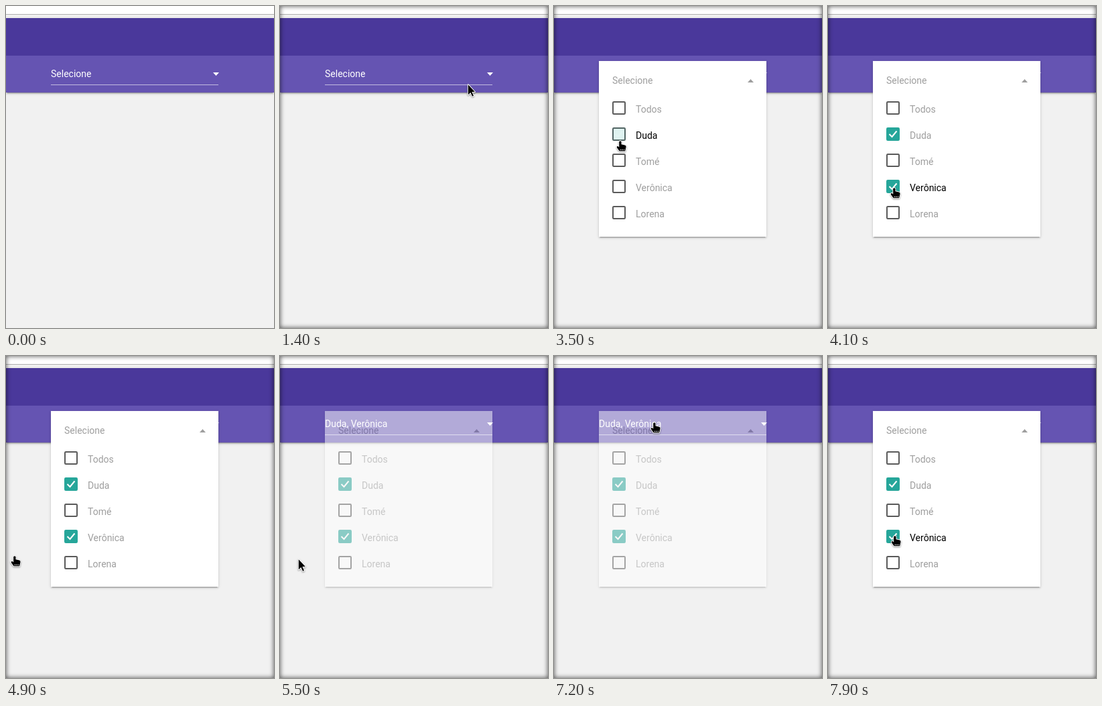
An HTML page that plays this animation: 400x480 px, repeating every 8000 ms.

```html
<!DOCTYPE html>
<html lang="pt-BR">
<head>
<meta charset="utf-8">
<title>Multi-select</title>
<style>
  html, body { margin: 0; width: 100%; height: 100%; overflow: hidden; background: #f1f1f1; }
  #stage { position: relative; width: 400px; height: 480px; overflow: hidden; background: #f1f1f1; }
  #stage > * { position: absolute; }
  .raised { box-shadow: 0 2px 2px rgba(0,0,0,.14), 0 1px 5px rgba(0,0,0,.12), 0 3px 1px -2px rgba(0,0,0,.2); }
  .chrome { left: 0; top: 0; width: 400px; height: 12px; background: #fff; border-bottom: 1px solid #b0b0b0; }
  .bar { left: 0; top: 18px; width: 400px; height: 111px; background: linear-gradient(#4a389b 56px, #6554b2 56px); }
  #card { left: 67px; top: 82px; width: 250px; height: 262px; background: #fff; }
  #edge { inset: 0; box-shadow: inset 0 0 7px rgba(0,0,0,.7); }
  svg { position: absolute; left: 0; top: 0; overflow: visible; }
  text { font: 14px Roboto, sans-serif; }
  .pointer { stroke: #fff; stroke-linejoin: round; paint-order: stroke; filter: drop-shadow(0 1px 1px rgba(0,0,0,.4)); }
</style>
</head>
<body>
<div id="stage">
  <div class="chrome"></div>
  <div class="bar raised"></div>
  <svg width="400" height="480">
    <text id="value" x="67" y="106" fill="#fff"></text>
    <path d="M309 99h9l-4.5 5z" fill="#fff"/>
    <rect x="67" y="117" width="250" height="1" fill="#fff" opacity=".6"/>
  </svg>
  <div id="card" class="raised">
    <svg id="list" width="250" height="262">
      <text x="20" y="34" fill="#9e9e9e">Selecione</text>
      <path d="M222 32h9l-4.5 -5z" fill="#9e9e9e"/>
    </svg>
  </div>
  <div id="edge"></div>
  <svg width="400" height="480">
    <path id="arrow" class="pointer" stroke-width="2"
          d="M.8 1.2V16.2L4.4 12.9L7 18.7L9 17.8L6.4 12.1H10.9Z"/>
    <g id="hand">
      <path class="pointer" stroke-width="1.8"
            d="M-1.8 1.2Q0 -.8 1.5 1.2V5.2L7 6.5Q9 7.2 8.5 9.5L7.2 15.3H-1.4L-5.2 10Q-5.6 7.6 -3.6 8L-1.8 9.4Z"/>
      <path d="M-.5 13.3H6.5" stroke="#fff" stroke-width=".9" stroke-dasharray="2 .8"/>
    </g>
  </svg>
</div>
<script>
const LOOP = 8000, STEP = 100, ROW = 39, FADE = 300;
const names = ['Todos', 'Duda', 'Tomé', 'Verônica', 'Lorena'];
const picks = [{ row: 1, at: 3485 }, { row: 3, at: 3985 }];

// Pointer moves: begin, end, and where the tip arrives
const enter = { x: 368, y: 273 };
const moves = [
  { from: 700, to: 1400, x: 280, y: 116 },
  { from: 1400, to: 1700, x: 276, y: 99 },
  { from: 2000, to: 2500, x: 205, y: 120 },
  { from: 2500, to: 2900, x: 152, y: 111 },
  { from: 2900, to: 3300, x: 99, y: 201 },
  { from: 3600, to: 3950, x: 99, y: 271 },
  { from: 4200, to: 4900, x: 13, y: 298 },
  { from: 4900, to: 5200, x: 27, y: 302 },
  { from: 5900, to: 6100, x: 27, y: 298 },
  { from: 6100, to: 6900, x: 150, y: 99 },
  { from: 7200, to: 7900, x: 100, y: 268 }
];

const $ = id => document.getElementById(id);
const ramp = (t, from, length) => Math.min(1, Math.max(0, (t - from) / length));
const ease = p => p * p * (3 - 2 * p);
const lerp = (a, b, p) => a + (b - a) * p;
const mix = (a, b, p) => `rgb(${a.map((v, i) => Math.round(lerp(v, b[i], p)))})`;
const show = (el, on) => { el.style.visibility = on ? 'visible' : 'hidden'; };

function add(tag, attrs, text = '') {
  const el = document.createElementNS('http://www.w3.org/2000/svg', tag);
  for (const key in attrs) el.setAttribute(key, attrs[key]);
  el.textContent = text;
  $('list').append(el);
  return el;
}

const rows = names.map((name, i) => {
  const y = 60 + i * ROW;
  return {
    box: add('rect', { x: 21, y: y + 1, width: 18, height: 18, rx: 1.2, 'stroke-width': 2 }),
    mark: add('path', { d: `M24.5 ${y + 10}l4 4l7 -8.5`, fill: 'none', stroke: '#fff', 'stroke-width': 2 }),
    label: add('text', { x: 55, y: y + 17 }, name),
    pick: picks.find(p => p.row === i)
  };
});

function pointer(t) {
  return moves.reduce((pos, m) => {
    const p = ease(ramp(t, m.from, m.to - m.from));
    return { x: lerp(pos.x, m.x, p), y: lerp(pos.y, m.y, p) };
  }, enter);
}

function drawPointer(t, { x, y }, open) {
  const overSelect = x > 67 && x < 317 && y < 115;
  const active = open === 1 || overSelect ? $('hand') : $('arrow');
  for (const el of [$('arrow'), $('hand')]) show(el, t >= moves[0].from && el === active);
  active.setAttribute('transform', `translate(${Math.round(x)} ${Math.round(y)})`);
}

function drawRows(t, { x, y }, open) {
  const hovered = open === 1 && x > 87 && x < 297 ? Math.floor((y - 133) / ROW) : -1;
  rows.forEach(({ box, mark, label, pick }, i) => {
    const p = pick ? ramp(t, pick.at, 100) : 0;
    box.setAttribute('fill', mix([255, 255, 255], [38, 166, 154], p));
    box.setAttribute('stroke', mix([90, 90, 90], [38, 166, 154], p));
    mark.setAttribute('opacity', p);
    label.setAttribute('fill', i === hovered ? '#000' : '#9e9e9e');
  });
}

function draw(t) {
  const pos = pointer(t);
  const open = ramp(t, 1950, FADE) - ramp(t, 5350, FADE) + ramp(t, 7050, FADE);
  $('card').style.opacity = open;
  $('value').textContent = t < 5300 ? 'Selecione' : picks.map(p => names[p.row]).join(', ');
  show($('edge'), t >= STEP);
  drawRows(t, pos, open);
  drawPointer(t, pos, open);
}

const start = performance.now();
function frame() {
  const t = (performance.now() - start) % LOOP;
  draw(Math.floor(t / STEP) * STEP);
  requestAnimationFrame(frame);
}
frame();
</script>
</body>
</html>
```
